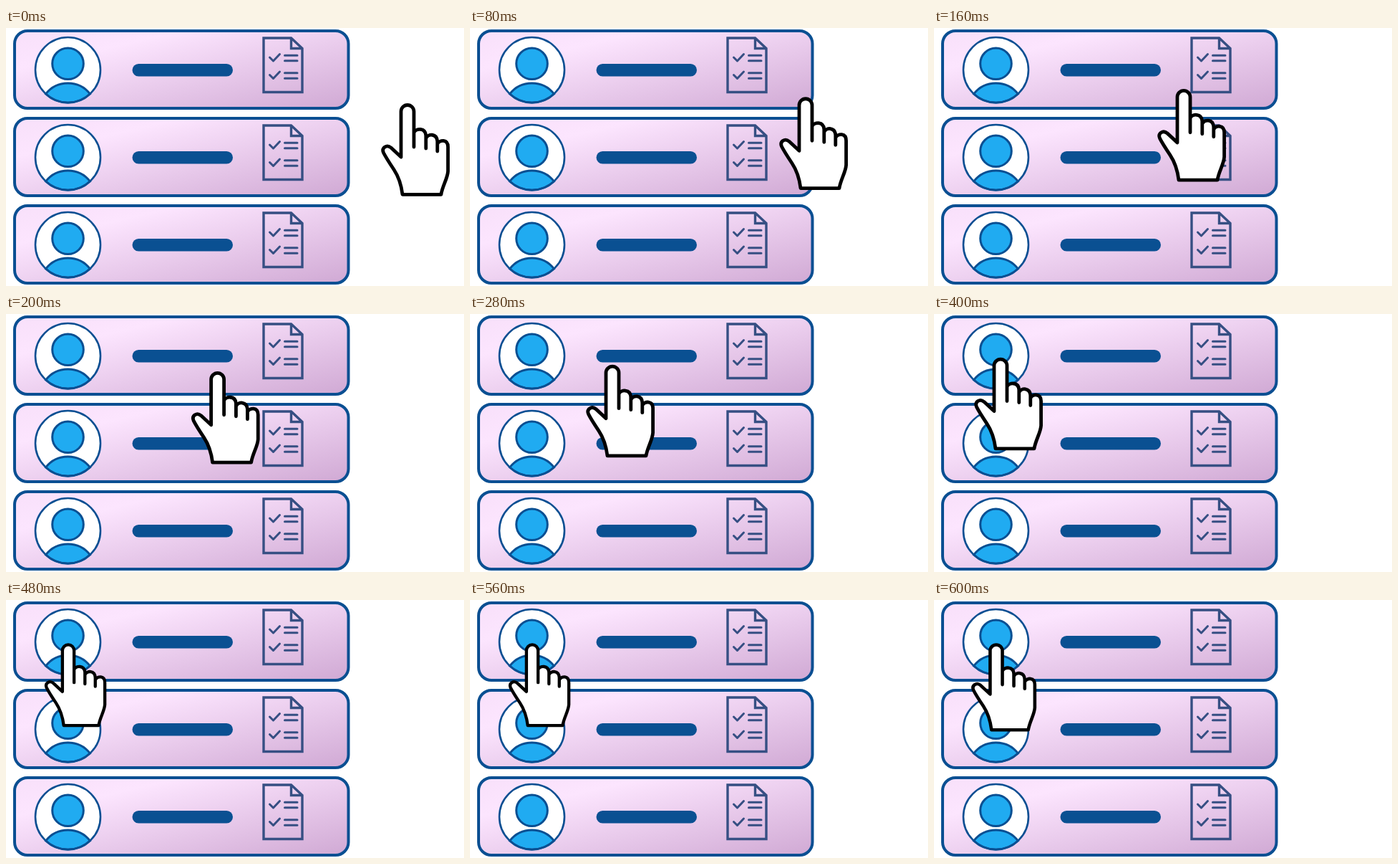
An HTML page that plays this animation: 640x360 px, repeating every 2800 ms.

```html
<!DOCTYPE html>
<html lang="en">
<head>
<meta charset="utf-8">
<title>Choose a card</title>
<style>
  html, body { margin: 0; width: 100%; height: 100%; overflow: hidden; background: #fff; }
  svg { display: block; width: 640px; height: 360px; }
</style>
</head>
<body>
<svg viewBox="0 0 640 360">
  <defs>
    <linearGradient id="pink" x1="0" y1="0" x2="1" y2="1">
      <stop offset="0" stop-color="#f8e0fa"/>
      <stop offset=".25" stop-color="#fce5fe"/>
      <stop offset="1" stop-color="#d0a9d4"/>
    </linearGradient>
    <g id="card" stroke="#0a4f92">
      <rect x="12" y="4" width="466.5" height="108" rx="18" fill="url(#pink)" stroke-width="4"/>
      <circle cx="86.5" cy="58.5" r="45.5" fill="#fff" stroke="none"/>
      <g fill="#20abf1" stroke-width="3">
        <circle cx="86.5" cy="49.8" r="21.8"/>
        <path d="M55.5 92A39.5 39.5 0 0 1 117.5 92A45.5 45.5 0 0 1 55.5 92Z"/>
      </g>
      <circle cx="86.5" cy="58.5" r="45.5" fill="none" stroke-width="2.6"/>
      <rect x="176.5" y="50" width="140.5" height="17.5" rx="8.75" fill="#0a5092" stroke="none"/>
      <g fill="none" stroke="#364f83" stroke-width="3.4">
        <path d="M360 14H398.5L414 28.5V89.5H360ZM398.5 14V28.5H414"/>
        <path id="task" stroke-width="3" stroke-linecap="round" stroke-linejoin="round"
          d="M368.5 41l5 5 9-9.5M389.5 38.3h17.5M389.5 45.7h17.5"/>
        <use href="#task" y="24.5"/>
      </g>
    </g>
  </defs>
  <use href="#card"/>
  <use href="#card" y="122"/>
  <use href="#card" y="244"/>
  <!-- The origin of the hand is its fingertip -->
  <g id="hand">
    <path transform="translate(-561 -106)" fill="#fff" stroke="#000" stroke-width="4.8" stroke-linejoin="round"
      d="M554 232.3C552 216 547 205 542 197.5C537 190 531 181 527.5 174C524.5 167 532 162 538 167L552 180
         V116.5a9 9 0 0 1 18 0V166V146C573 139.5 586 139 586.8 150V168V154C590 147 602 147 602.8 158V172V162
         C606 155.5 617.6 155 617.6 166V200C617 210 610 220 608 232.3Z"/>
  </g>
</svg>
<script>
  const LOOP = 2800, STEP = 40, REST = 600;
  const START = { x: 561, y: 106 }, END = { x: 87, y: 61 };
  // Glide keys: time, x, speed
  const keys = [
    [0, START.x, -0.6], [80, 469, -1.325], [160, 349, -1.35],
    [280, 199, -1.07], [400, 93, -0.5], [440, END.x, 0]
  ];
  const hand = document.getElementById('hand');

  function glideX(t) {
    const i = keys.findIndex(key => t < key[0]);
    if (i < 0) return END.x;
    const [t0, x0, v0] = keys[i - 1], [t1, x1, v1] = keys[i];
    const d = t1 - t0, u = (t - t0) / d, w = 1 - u;
    return w * w * ((1 + 2 * u) * x0 + u * d * v0) + u * u * ((1 + 2 * w) * x1 - w * d * v1);
  }

  // Press down and release around 520 ms
  const pressScale = t => 1 - 0.145 * Math.max(0, 1 - Math.abs(t - 520) / 120);

  function draw(now) {
    const t = Math.min(Math.floor(now % LOOP / STEP) * STEP, REST);
    const x = glideX(t);
    const y = END.y + (START.y - END.y) * (x - END.x) / (START.x - END.x);
    hand.setAttribute('transform', `translate(${x} ${y}) scale(${pressScale(t)})`);
  }

  const begin = performance.now();
  function tick() {
    draw(performance.now() - begin);
    requestAnimationFrame(tick);
  }
  tick();
</script>
</body>
</html>
```
